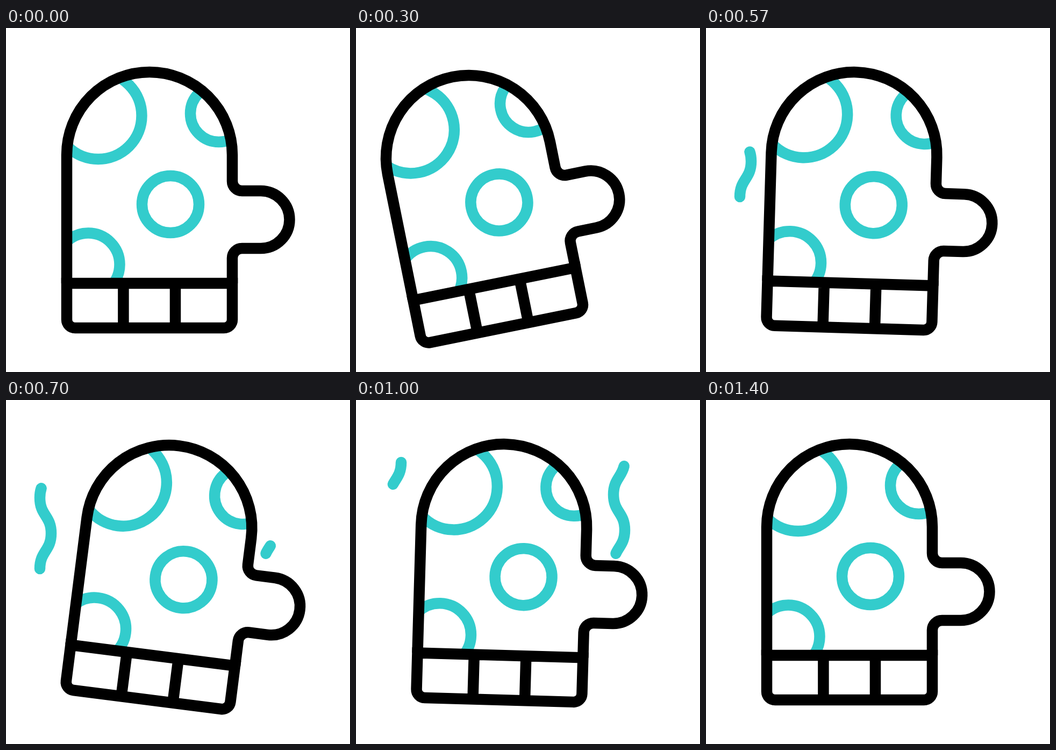
Animation of 640 by 640 pixels, one loop 1.67 s. Source, as an HTML page with a canvas:

```html
<!DOCTYPE html>
<html lang="en">
<head>
<meta charset="utf-8">
<title>Oven mitt</title>
<style>
  html, body { margin: 0; width: 100%; height: 100%; overflow: hidden; background: #fff; }
  canvas { display: block; width: 640px; height: 640px; }
</style>
</head>
<body>
<canvas id="stage" width="640" height="640"></canvas>
<script>
const ctx = document.getElementById('stage').getContext('2d');
const LOOP = 1670;
const LAST_TICK = 42;
const TEAL = '#33cccc';
const PIVOT_X = 268.5, PIVOT_Y = 524;

const mitt = new Path2D(
  'M113 475 V236 A154 154 0 0 1 421 236 V285 A18 18 0 0 0 439 303 H474 ' +
  'A53.5 53.5 0 0 1 474 410 H439 A18 18 0 0 0 421 428 V475');

const cuff = new Path2D();
cuff.roundRect(113, 475, 308, 83, [0, 0, 15.5, 15.5]);
for (const x of [218.4, 315]) {
  cuff.moveTo(x, 475);
  cuff.lineTo(x, 558);
}

// A rising wave of three equal S-curves, alternating right and left.
function makeWave(x, y, width, step) {
  let d = `M${x} ${y}`;
  for (let i = 0; i < 3; i++) {
    const nextX = x + (i % 2 ? 0 : width);
    y -= step;
    d += ` S${nextX} ${y + step / 2} ${nextX} ${y}`;
    if (i === 0) d = `M${x} ${y + step} C${x} ${y + step / 2} ${nextX} ${y + step / 2} ${nextX} ${y}`;
  }
  const node = document.createElementNS('http://www.w3.org/2000/svg', 'path');
  node.setAttribute('d', d);
  return { path: new Path2D(d), length: node.getTotalLength() };
}
const wave = makeWave(63, 314, 21, 66);

const progress = (tick, start, duration) => Math.min(1, Math.max(0, (tick - start) / duration));

const ease = (p, power) =>
  p < 0.5 ? (2 * p) ** power / 2 : 1 - (2 - 2 * p) ** power / 2;

// Five swings to alternating sides, each weaker than the one before; the last comes to rest.
function swingAngle(tick) {
  let angle = 0, start = 4;
  for (let k = 0; k < 5; k++) {
    const duration = k < 2 ? 8 : 16 / 3;
    const peak = k < 4 ? -16.6 * (-0.47) ** k : 0;
    angle += (peak - angle) * ease(progress(tick, start, duration), k ? 2.4 : 1.65);
    start += duration;
    if (tick <= start) break;
  }
  return angle * Math.PI / 180;
}

// Both plumes share one wave; `lowest` hides the part of it below that fraction.
function drawSteam(tick, dx = 0, dy = 0, lowest = 0) {
  const head = progress(tick, 12, 12);
  const alpha = 1 - progress(tick, 30.4, 5);
  if (head <= lowest || !alpha) return;
  const tail = Math.min(Math.max(progress(tick, 22.5, 9.5), lowest), head - 0.001);
  ctx.save();
  ctx.translate(dx, dy);
  ctx.globalAlpha = alpha;
  ctx.strokeStyle = TEAL;
  ctx.lineCap = 'round';
  ctx.setLineDash([(head - tail) * wave.length, 2 * wave.length]);
  ctx.lineDashOffset = -tail * wave.length;
  ctx.stroke(wave.path);
  ctx.restore();
}

function drawRing(x, y, radius) {
  ctx.beginPath();
  ctx.arc(x, y, radius, 0, 2 * Math.PI);
  ctx.stroke();
}

function drawMitt(tick) {
  ctx.save();
  ctx.translate(PIVOT_X, PIVOT_Y);
  ctx.rotate(swingAngle(tick));
  ctx.translate(-PIVOT_X, -PIVOT_Y);

  ctx.save();
  ctx.clip(mitt);
  ctx.strokeStyle = TEAL;
  drawRing(171.5, 163, 81);
  drawRing(396, 159, 53);
  drawRing(306, 328, 53);
  drawRing(153, 440, 58.5);
  ctx.restore();

  ctx.strokeStyle = '#000';
  ctx.stroke(mitt);
  ctx.stroke(cuff);
  ctx.restore();
}

function draw(time) {
  // The picture advances 30 times a second, then rests.
  const tick = Math.min(LAST_TICK, Math.floor((time % LOOP) * 0.03 + 0.11));
  ctx.fillStyle = '#fff';
  ctx.fillRect(0, 0, 640, 640);
  ctx.lineWidth = 20.5;
  drawSteam(tick - 6.75, 416, -6, 0.108);
  drawMitt(tick);
  drawSteam(tick);
}

const startTime = performance.now();
function loop() {
  draw(performance.now() - startTime);
  requestAnimationFrame(loop);
}
loop();
</script>
</body>
</html>
```
